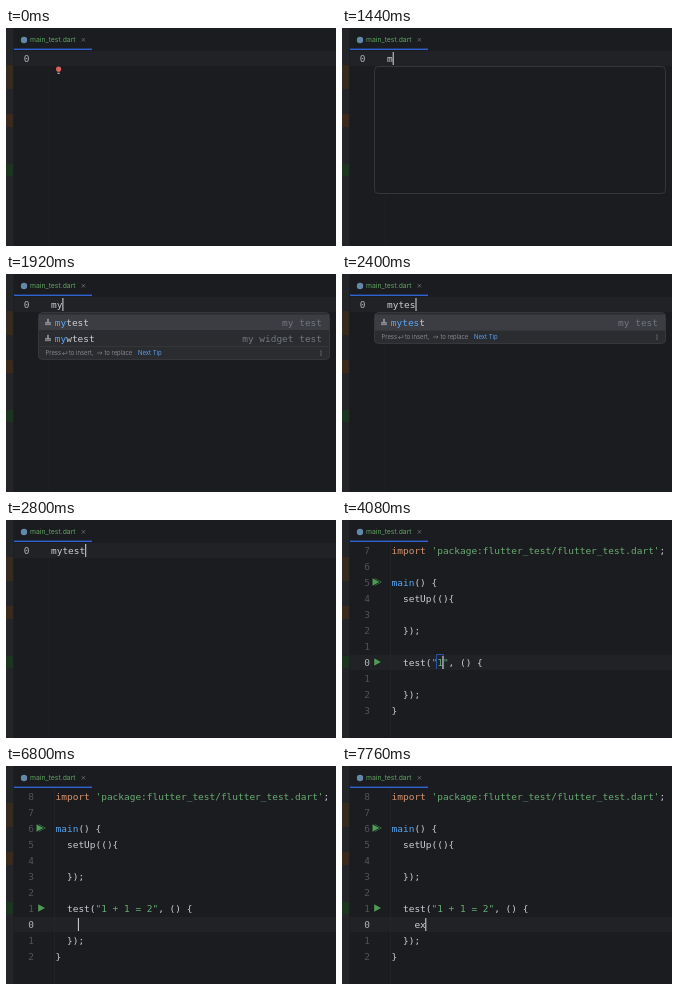
An HTML page with a canvas that plays this animation: 330x218 px, repeating every 8000 ms.

```html
<!DOCTYPE html>
<html lang="en">
<head>
<meta charset="utf-8">
<title>Live template demo</title>
<style>
html, body { margin: 0; width: 100%; height: 100%; overflow: hidden; background: #1b1c1f; }
canvas { display: block; width: 330px; height: 218px; }
</style>
</head>
<body>
<canvas id="stage"></canvas>
<script>
const W = 330, H = 218, LOOP = 8000, CW = 5.7, ROW = 16, TOP = 30;
const MONO = '9.47px "DejaVu Sans Mono", "Noto Sans Mono", monospace';
const UI = size => size + 'px Inter, "Open Sans", sans-serif';
const C = {
  bg: '#1b1c1f', line: '#202225', edge: '#3b3d42', text: '#cbcdd3', dim: '#50535a',
  tab: '#2f63cf', field: '#2d5bb5', link: '#5c9ff0', key: '#d8946f', str: '#6aab73',
  fn: '#56a8f5', run: '#4f9a57', caret: '#d6d8de'
};

const canvas = document.getElementById('stage');
const g = canvas.getContext('2d');
const dpr = Math.max(1, window.devicePixelRatio || 1);
canvas.width = W * dpr;
canvas.height = H * dpr;

function rect(x, y, w, h, color) {
  g.fillStyle = color;
  g.fillRect(x, y, w, h);
}

function circle(x, y, r, color) {
  g.fillStyle = color;
  g.beginPath();
  g.arc(x, y, r, 0, 7);
  g.fill();
}

function path(points, color, width = 0.8) {
  g.strokeStyle = color;
  g.lineWidth = width;
  g.beginPath();
  points.forEach(([x, y]) => g.lineTo(x, y));
  g.stroke();
}

function label(s, x, y, color, font) {
  g.font = font;
  g.fillStyle = color;
  g.fillText(s, x, y);
}

// Draws [text, color] runs on the monospace grid.
function code(x, y, ...runs) {
  for (const [s, color = C.text] of runs) {
    label(s, x, y + 3.9, color, MONO);
    x += s.length * CW;
  }
}

// How many of the typed moments have passed.
const typed = (t, times) => times.filter(m => t >= m).length;
const rowY = i => TOP + i * ROW;
const caret = (x, y) => rect(x, y - 6, 1, 13, C.caret);

function frameOfEditor() {
  rect(0, 0, W, H, C.bg);
  rect(0, 0, 7, H, '#242528');
  rect(0, 37, 7, 24, '#362b1f');
  rect(0, 86, 7, 13, '#3a2a1e');
  rect(0, 136, 7, 12, '#1e3423');
  rect(7, 0, 1, H, '#1e1f22');
  circle(18, 12, 3.2, '#6488ab');
  label('main_test.dart', 24, 14.2, '#5fa463', UI(6.85));
  path([[75.8, 10.2], [79, 13.4]], '#7b7e85', 0.7);
  path([[79, 10.2], [75.8, 13.4]], '#7b7e85', 0.7);
  rect(8, 20.6, 78, 1.4, C.tab);
}

function currentLine(y) {
  rect(8, y - 7, W - 8, 15, C.line);
}

function lineNumbers(x, count, current) {
  for (let i = 0; i < count; i++)
    code(x, rowY(i), [String(Math.abs(i - current)), i === current ? '#b3b5bc' : C.dim]);
}

function bulb() {
  circle(52.6, 41, 2.6, '#d9625b');
  rect(51.3, 43.4, 2.6, 1, '#d9625b');
  rect(51.5, 45, 2.2, 0.9, '#b9bbc0');
}

function templateIcon(x, y) {
  rect(x - 0.7, y - 3.2, 1.4, 4, '#a5a8ae');
  rect(x - 3, y + 0.3, 6, 1.2, '#a5a8ae');
  rect(x - 3, y + 2.3, 6, 0.8, '#a5a8ae');
}

function popup(height, fill) {
  g.beginPath();
  g.roundRect(32.5, 38.5, 291, height - 1, 4);
  g.fillStyle = fill;
  g.fill();
  g.strokeStyle = C.edge;
  g.lineWidth = 0.8;
  g.stroke();
}

function suggestion(i, name, info, match) {
  const y = 48 + i * ROW;
  if (i === 0) rect(33, 40.5, 290, 15.5, '#3b3d42');
  templateIcon(42, y);
  code(48.8, y, [name.slice(0, match), C.fn], [name.slice(match)]);
  code(316 - info.length * CW, y, [info, '#73767d']);
}

function popupFooter(bottom) {
  const y = bottom - 7, gray = '#85888f', font = UI(5.9);
  rect(33, bottom - 14, 290, 0.6, '#3b3d42');
  label('Press', 39.5, y + 2, gray, font);
  path([[60.8, y - 2], [60.8, y + 0.6], [56.5, y + 0.6]], gray, 0.6);
  path([[58, y - 0.8], [56.5, y + 0.6], [58, y + 2]], gray, 0.6);
  label('to insert,', 63, y + 2, gray, font);
  path([[91, y], [96, y]], gray, 0.6);
  path([[94.5, y - 1.5], [96, y], [94.5, y + 1.5]], gray, 0.6);
  label('to replace', 98.5, y + 2, gray, font);
  label('Next Tip', 132, y + 2, C.link, font);
  for (let k = -1; k <= 1; k++) circle(315, y + k * 2, 0.55, '#a5a8ae');
}

function completion(t, n) {
  if (t < 1360 || t >= 2800) return;
  const height = n < 2 ? 128 : n < 3 ? 48 : 32;
  g.globalAlpha = t < 1440 ? 0.5 : 1;
  popup(height, t < 1520 ? C.bg : '#2a2c2f');
  g.globalAlpha = 1;
  if (t < 1520) return;
  suggestion(0, 'mytest', 'my test', n);
  if (n < 3) suggestion(1, 'mywtest', 'my widget test', n);
  popupFooter(38 + height);
}

function abbreviation(t) {
  const n = typed(t, [1200, 1760, 2080, 2240, 2320, 2480]);
  const x = 45, y = rowY(0);
  currentLine(y);
  rect(43, 38, 0.6, H - 38, '#222327');
  lineNumbers(17.7, 1, 0);
  code(x, y, ['mytest'.slice(0, n)]);
  if (t >= 240 && t < 720) rect(x, 24, CW, 13, C.caret);
  else if (t >= 720) caret(x + n * CW, y);
  if (t < 720 || (t >= 1040 && t < 1200)) bulb();
  completion(t, n);
}

function runArrow(x, y) {
  g.beginPath();
  g.moveTo(x, y - 3.8);
  g.lineTo(x + 6.8, y);
  g.lineTo(x, y + 3.8);
  g.closePath();
  g.strokeStyle = C.bg;
  g.lineWidth = 1.6;
  g.stroke();
  g.fillStyle = C.run;
  g.fill();
}

function expanded(t) {
  const x = 49.6, inBody = t >= 6800, current = inBody ? 8 : 7;
  const name = '1 + 1 = 2'.slice(0, typed(t, [4080, 4560, 4880, 5040, 5280, 5920, 6080, 6240, 6400]));
  const body = 'ex'.slice(0, typed(t, [7520, 7760]));
  currentLine(rowY(current));
  rect(48, 23, 0.7, H - 23, '#26272b');
  lineNumbers(22.3, 11, current);
  runArrow(33, rowY(2));
  runArrow(30.5, rowY(2));
  runArrow(32.2, rowY(7));

  code(x, rowY(0), ['import ', C.key], ["'package:flutter_test/flutter_test.dart'", C.str], [';']);
  code(x, rowY(2), ['main', C.fn], ['() {']);
  code(x, rowY(3), ['  setUp((){']);
  code(x, rowY(5), ['  });']);
  code(x, rowY(7), ['  test('], ['"' + name + '"', C.str], [', () {']);
  code(x, rowY(8), ['    ' + body]);
  code(x, rowY(9), ['  });']);
  code(x, rowY(10), ['}']);

  if (inBody) {
    caret(x + (4 + body.length) * CW - 0.5, rowY(8));
    return;
  }
  const right = 95.9 + name.length * CW;
  path([[94.5, 149], [94.5, 134.5], [right, 134.5], [right, 149]], C.field, 0.9);
  if (t < 3680 || t >= 4080) caret(right - 1.2, rowY(7));
}

function draw(now) {
  const t = now % LOOP;
  g.setTransform(dpr, 0, 0, dpr, 0, 0);
  frameOfEditor();
  (t < 2880 ? abbreviation : expanded)(t);
}

function tick() {
  draw(performance.now() - start);
  requestAnimationFrame(tick);
}

const start = performance.now();
tick();
</script>
</body>
</html>
```
